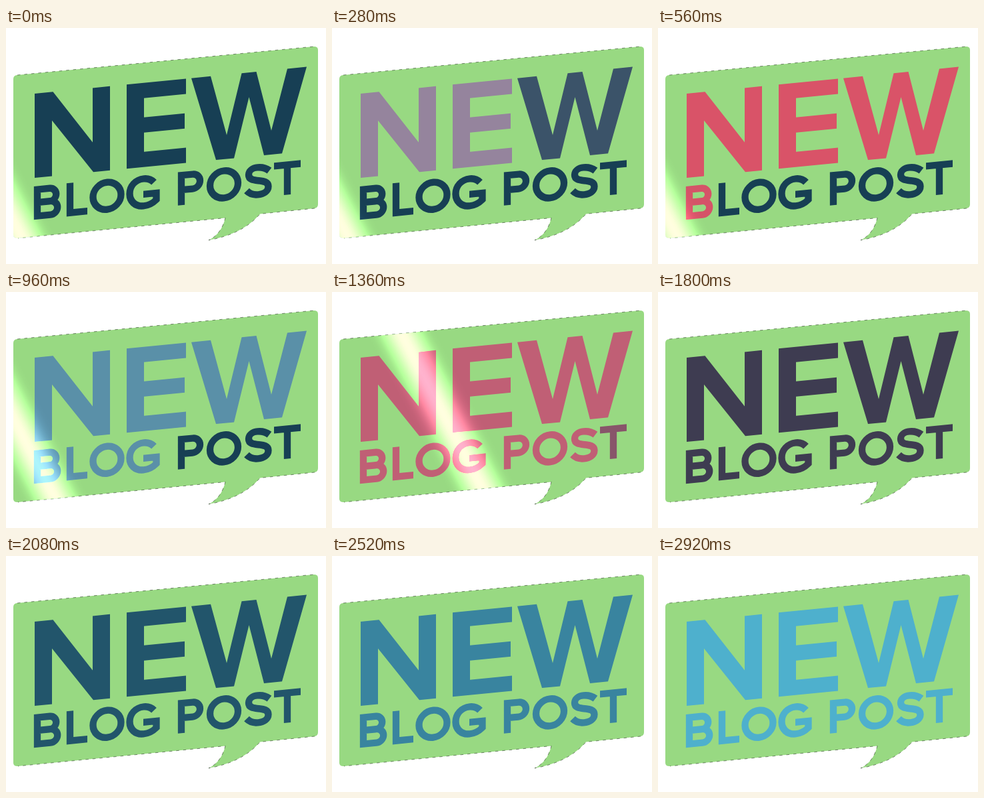
Animation of 480x356 px, one loop 3 s. Source, as an HTML page with a canvas:

```html
<!DOCTYPE html>
<html lang="en">
<head>
<meta charset="utf-8">
<title>New blog post</title>
<style>
html, body { margin: 0; width: 100%; height: 100%; overflow: hidden; background: #fff; }
canvas { display: block; width: 480px; height: 356px; }
</style>
</head>
<body>
<canvas id="stage" width="480" height="356" role="img" aria-label="NEW BLOG POST">NEW BLOG POST</canvas>
<script>
const ctx = document.getElementById('stage').getContext('2d');
const LOOP = 3000, STEP = 40, LAST = 2920;
const SLOPE = -0.099;
const TYPE_START = 42, TYPE_STEP = 104;

const NAVY = [23, 63, 84], BLUE = [80, 180, 210], RED = [217, 83, 104];
const STEEL = [90, 144, 168], MAROON = [140, 55, 74];
const tints = [[0, BLUE], [560, RED], [960, STEEL], [1460, RED], [1640, MAROON], [1880, NAVY], [2960, BLUE]];

const clamp = v => Math.max(0, Math.min(1, v));
const mix = (a, b, k) => a.map((v, i) => v + (b[i] - v) * k);
const rgb = c => `rgb(${c.map(Math.round).join(',')})`;

function tintAt(t) {
  const i = tints.findIndex(key => key[0] > t);
  const [t0, a] = tints[i - 1], [t1, b] = tints[i];
  return mix(a, b, (t - t0) / (t1 - t0));
}

// The light streak creeps in, then races off to the right
const sweepAt = t => -47 + 62 * (t / 1000) ** 4;

const bubble = new Path2D(
  'M11 77Q11 71.5 17 71L461 28Q468 27.5 468 33V266Q468 271 463 272L381 280.5' +
  'Q355 311 304 320Q323 311 329 286.5L18 317Q11 317.5 11 312Z');
const rim = new Path2D(
  'M17 71L461 28M463 272L381 280.5Q355 311 304 320Q323 311 329 286.5L18 317');

// Upright letters: the big row is filled, the small row is stroked
const big = [
  'M43 0H70.5L130 82V0H156V127H131L69 43V127H43Z',
  'M181 0H270V23H207V52H268V75H207V104H270V127H181Z',
  'M278 0H307L331 91L353.5 0H375.500L398 91L422 0H451L414 127H387L364.5 37L342 127H315Z'
];
const ring = x => `M${x - 21} 25a21 20.5 0 1 1 42 0a21 20.5 0 1 1 -42 0Z`;
const blog = [
  'M47 24.5V5H65.5a9.75 9.75 0 0 1 0 19.5H47V45H67a10.25 10.25 0 0 0 0-20.5',
  'M96 0V45H122',
  ring(151.5),
  'M222 11.5C218 7 212.5 4.5 206.5 4.5C194 4.5 185.5 13.5 185.5 25' +
    'S194 45.5 206.5 45.5C214 45.5 220.5 42.5 225.5 38V28H206'
];
const post = [
  'M263 50V5H280a11 11 0 0 1 0 22H263',
  ring(327),
  'M395 11C389 6 383 4.5 377 4.5C369 4.5 364 8.5 364 14C364 29 393.5 20 393.5 35' +
    'C393.5 42 387 45.5 378 45.5C371 45.5 365 42.5 361 38',
  'M402 5H442M422 5V50'
];

// Each word counts its letters from a slot; the spaces use one slot too
const word = (list, first, top, method) =>
  list.map((d, i) => ({ path: new Path2D(d), slot: first + i, top, method }));
const letters = [
  ...word(big, 0, 99, 'fill'),
  ...word(blog, 4, 239, 'stroke'),
  ...word(post, 9, 239, 'stroke')
];

function drawLetters(t) {
  const tint = tintAt(t);
  ctx.lineWidth = 10.3;
  for (const { path, slot, top, method } of letters) {
    const on = clamp((t - TYPE_START) / TYPE_STEP - slot);
    ctx.save();
    ctx.transform(1, SLOPE, 0, 1, 0, top - 43 * SLOPE);
    ctx.fillStyle = ctx.strokeStyle = rgb(mix(NAVY, tint, on));
    ctx[method](path);
    ctx.restore();
  }
}

function band(half, blend, colour) {
  const g = ctx.createLinearGradient(-half, 0, half, 0);
  for (let i = 0; i <= 16; i++) g.addColorStop(i / 16, colour(Math.sin(Math.PI * i / 16) ** 2));
  ctx.globalCompositeOperation = blend;
  ctx.fillStyle = g;
  ctx.fillRect(-half, 0, 2 * half, 356);
}

function drawSheen(x) {
  ctx.save();
  ctx.clip(bubble);
  ctx.transform(1, 0, 0.52, 1, x - 0.52 * 180, 0);
  band(52, 'color-dodge', k => rgb([105 * k, 105 * k, 105 * k]));
  band(40, 'source-over', k => `rgba(255,250,235,${0.2 * k})`);
  ctx.restore();
}

function drawRim() {
  ctx.save();
  ctx.strokeStyle = 'rgba(20,35,15,.75)';
  ctx.lineWidth = 0.7;
  ctx.setLineDash([4.5, 6]);
  ctx.stroke(rim);
  ctx.restore();
}

function draw(t) {
  ctx.fillStyle = '#fff';
  ctx.fillRect(0, 0, 480, 356);
  ctx.fillStyle = '#98d982';
  ctx.fill(bubble);
  drawRim();
  drawLetters(t);
  drawSheen(sweepAt(t));
}

const start = performance.now();
function tick() {
  const t = (performance.now() - start) % LOOP;
  draw(Math.min(LAST, Math.floor(t / STEP) * STEP));
  requestAnimationFrame(tick);
}
tick();
</script>
</body>
</html>
```
